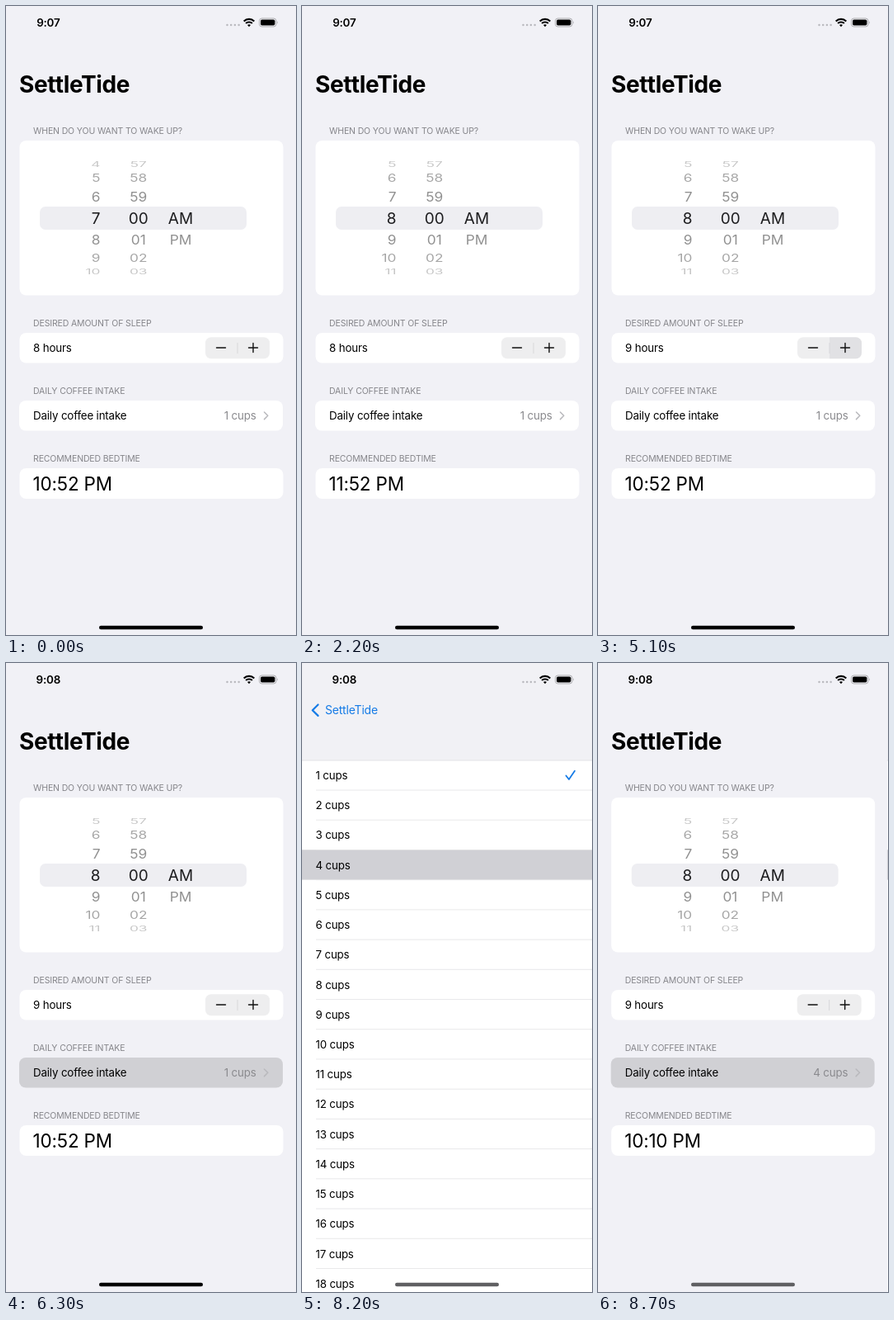
Animation of 352 by 762 pixels, one loop 8800 ms. Source, as an HTML page:

```html
<!DOCTYPE html>
<html lang="en">
<head>
<meta charset="utf-8">
<title>Bedtime planner</title>
<style>
html, body { margin: 0; width: 100%; height: 100%; overflow: hidden; background: #f1f1f6; }
svg { display: block; width: 352px; height: 762px; font-family: Inter, sans-serif; }
text { white-space: pre; }
.head { font-size: 10.5px; letter-spacing: -.13px; fill: #85858a; }
.body { font-size: 13.3px; letter-spacing: -.15px; }
.soft { fill: #8a8a8e; text-anchor: end; }
.big { font-size: 22.5px; letter-spacing: -.2px; }
.title { font-size: 28px; font-weight: 700; letter-spacing: -.4px; }
.back { font-size: 14px; letter-spacing: -.2px; fill: #157be6; }
.clock { font-size: 13.4px; font-weight: 600; letter-spacing: -.2px; text-anchor: middle; }
.near { font-size: 19px; fill: #1c1c1e; }
.far { font-size: 17.3px; }
.card { fill: #fff; }
.line { fill: none; stroke-linecap: round; stroke-linejoin: round; }
</style>
</head>
<body>
<svg viewBox="0 0 352 762">
  <defs>
    <clipPath id="inBand"><rect x="40" y="243" width="253" height="28"/></clipPath>
    <clipPath id="offBand"><path d="M40 185H293V243H40ZM40 271H293V329H40Z"/></clipPath>
  </defs>
  <rect width="352" height="762" fill="#f1f1f6"/>

  <g id="main">
    <text class="head" x="33" y="155">WHEN DO YOU WANT TO WAKE UP?</text>
    <rect class="card" x="16.5" y="163" width="320" height="187.5" rx="8"/>
    <rect x="41" y="243" width="251" height="28" rx="7" fill="#eeeef2"/>
    <g id="far" clip-path="url(#offBand)"></g>
    <g id="near" clip-path="url(#inBand)"></g>

    <text class="head" x="33" y="388">DESIRED AMOUNT OF SLEEP</text>
    <rect class="card" x="16.5" y="396" width="320" height="36.5" rx="8"/>
    <text class="body" id="hours" x="33" y="419"></text>
    <rect x="242" y="401.3" width="78" height="26" rx="7" fill="#eeeeef"/>
    <path id="press" d="M281 401.300H313a7 7 0 0 1 7 7V420.300a7 7 0 0 1-7 7H281Z" fill="#d6d6d9"/>
    <path d="M281 408V421" stroke="#d8d8da" stroke-width="1"/>
    <path class="line" d="M255.500 414H266.500M294.500 414H305.500M300 408.500V419.500" stroke="#111" stroke-width="1.400"/>

    <text class="head" x="33" y="470">DAILY COFFEE INTAKE</text>
    <rect class="card" id="coffee" x="16" y="478" width="320" height="36.5" rx="8"/>
    <text class="body" x="33" y="501">Daily coffee intake</text>
    <text class="body soft" id="cups" x="303.600" y="501"></text>
    <path class="line" d="M313.500 492L317.800 496.300L313.500 500.600" stroke="#b9b9bd" stroke-width="1.500"/>

    <text class="head" x="33" y="552">RECOMMENDED BEDTIME</text>
    <rect class="card" x="16.5" y="560" width="320" height="37" rx="8"/>
    <text class="big" id="bed" x="32.5" y="586.700"></text>
  </g>
  <rect id="dim" width="352" height="762"/>

  <g id="list">
    <rect width="352" height="762" fill="#fff"/>
    <rect width="352" height="118" fill="#f1f1f5"/>
    <path d="M0 118H352" stroke="#dedee1" stroke-width=".8"/>
    <rect id="pick" y="226.300" width="352" height="36.300" fill="#d0d0d5"/>
    <g id="rows"></g>
    <path class="line" d="M320.500 136.500L324 141L331 130.800" stroke="#157be6" stroke-width="1.800"/>
  </g>

  <text class="title" id="title" x="16" y="105">SettleTide</text>
  <g id="back">
    <path class="line" d="M19.500 50.500L12.700 57.200L19.500 63.900" stroke="#157be6" stroke-width="2.200"/>
    <text class="back" x="28" y="62">SettleTide</text>
  </g>

  <text class="clock" id="clock" x="51.300" y="25"></text>
  <g fill="#b9b9be">
    <circle cx="268.500" cy="23" r="1.250"/><circle cx="273.200" cy="23" r="1.250"/>
    <circle cx="277.900" cy="23" r="1.250"/><circle cx="282.600" cy="23" r="1.250"/>
  </g>
  <g fill="none" stroke="#000" stroke-width="2.100">
    <path d="M288.700 18.400a9 9 0 0 1 12.600 0M291.100 21.100a5.600 5.600 0 0 1 7.800 0"/>
    <path d="M295 25.200L293 23.100a2.900 2.900 0 0 1 4 0Z" fill="#000" stroke="none"/>
  </g>
  <rect x="307.500" y="15" width="20.400" height="10" rx="3" fill="none" stroke="#a4a4a8" stroke-width=".9"/>
  <rect x="309" y="16.500" width="17.400" height="7" rx="1.700"/>
  <path d="M329 18.300q1.500 1.700 0 3.400Z" fill="#a4a4a8"/>
  <rect id="home" x="113" y="750.800" width="126" height="4.500" rx="2.200"/>
</svg>

<script>
const LOOP = 8800, STEP = 100, WIDTH = 352;
const RADIUS = 74.2, ROW_ANGLE = 20.5 * Math.PI / 180, WHEEL_Y = 257;
const PRESSES = [3200, 3800, 4500, 5000];
const PUSH = 6350, POP = 8200;

const $ = id => document.getElementById(id);
const set = (node, attrs) => {
  for (const name in attrs) node.setAttribute(name, attrs[name]);
  return node;
};
const addTo = (parent, tag, attrs, text = '') => {
  const node = set(document.createElementNS('http://www.w3.org/2000/svg', tag), attrs);
  node.textContent = text;
  return parent.appendChild(node);
};
const clamp = x => Math.min(1, Math.max(0, x));
const smooth = x => { x = clamp(x); return x * x * (3 - 2 * x); };
// Critically damped spring from 0 to 1.
const spring = ms => {
  const x = Math.max(0, ms) * .016;
  return 1 - (1 + x) * Math.exp(-x);
};
const pad = n => String(n).padStart(2, '0');

// A wheel column: dark text inside the band, pale text outside it.
function column(x, anchor, first, last, label) {
  const items = [];
  for (let k = first; k <= last; k++) {
    for (const layer of ['near', 'far']) {
      const size = layer === 'near' ? 19 : 17.3;
      const node = addTo($(layer), 'text',
        { class: layer, 'text-anchor': anchor, y: size * .364 }, label(k));
      items.push({ k, layer, node });
    }
  }
  return pos => items.forEach(({ k, layer, node }) => {
    const angle = (k - pos) * ROW_ANGLE;
    const depth = Math.max(0, Math.cos(angle));
    const y = WHEEL_Y + RADIUS * Math.sin(angle);
    set(node, {
      transform: `translate(${x} ${y}) scale(1 ${depth})`,
      opacity: layer === 'near' ? 1 : .46 * depth,
      display: Math.abs(angle) < 1.3 ? 'inline' : 'none'
    });
  });
}

const turnHours = column(114.5, 'end', -4, 5, k => (k + 18) % 12 + 1);
column(160.7, 'middle', -3, 3, k => pad((k + 60) % 60))(0);
column(212, 'middle', 0, 1, k => ['AM', 'PM'][k])(0);

for (let i = 0; i < 18; i++) {
  const y = 118 + 36.22 * i;
  addTo($('rows'), 'text', { class: 'body', x: 16.5, y: y + 23 }, `${i + 1} cups`);
  addTo($('rows'), 'path',
    { d: `M17 ${y + 36}H352`, stroke: '#e2e2e5', 'stroke-width': .8 });
}

function bedtime(wake, sleep, cups) {
  const min = (1440 + (wake - sleep) * 60 - 8 - 14 * (cups - 1)) % 1440;
  const hour = Math.floor(min / 60);
  return `${(hour + 11) % 12 + 1}:${pad(min % 60)} ${hour < 12 ? 'AM' : 'PM'}`;
}

function draw(t) {
  turnHours(.85 * smooth((t - 1230) / 370) + .15 * spring(t - 1750));

  const wake = t < 2100 ? 7 : 8;
  const sleep = 8 + .25 * PRESSES.filter(p => t >= p + 100).length;
  const cups = t < POP + 100 ? 1 : 4;
  $('hours').textContent = `${sleep} hours`;
  $('cups').textContent = `${cups} cups`;
  $('bed').textContent = bedtime(wake, sleep, cups);
  $('clock').textContent = t < 5600 ? '9:07' : '9:08';

  const glow = Math.max(...PRESSES.map(p => t < p ? 0 : clamp(1 - (t - p) / 200)));
  set($('press'), { opacity: glow });
  $('coffee').style.fill = t < 6300 ? '#fff' : '#d0d0d4';
  set($('pick'), { opacity: t < 8100 ? 0 : 1 });

  const open = spring(t - PUSH) - spring(t - POP);
  set($('main'), { transform: `translate(${-.3 * WIDTH * open} 0)` });
  set($('dim'), { opacity: .1 * open });
  set($('list'), { transform: `translate(${WIDTH * (1 - open)} 0)` });
  set($('title'), {
    opacity: clamp(1 - 1.5 * open),
    transform: `translate(${12 * open} ${-40 * open})`
  });
  set($('back'), { opacity: clamp(1.5 * open - .5) });
  set($('home'), { fill: t < 6500 ? '#000' : '#606063' });
}

const start = performance.now();
function tick() {
  const t = (performance.now() - start) % LOOP;
  draw(Math.floor(t / STEP) * STEP);
  requestAnimationFrame(tick);
}
tick();
</script>
</body>
</html>
```
